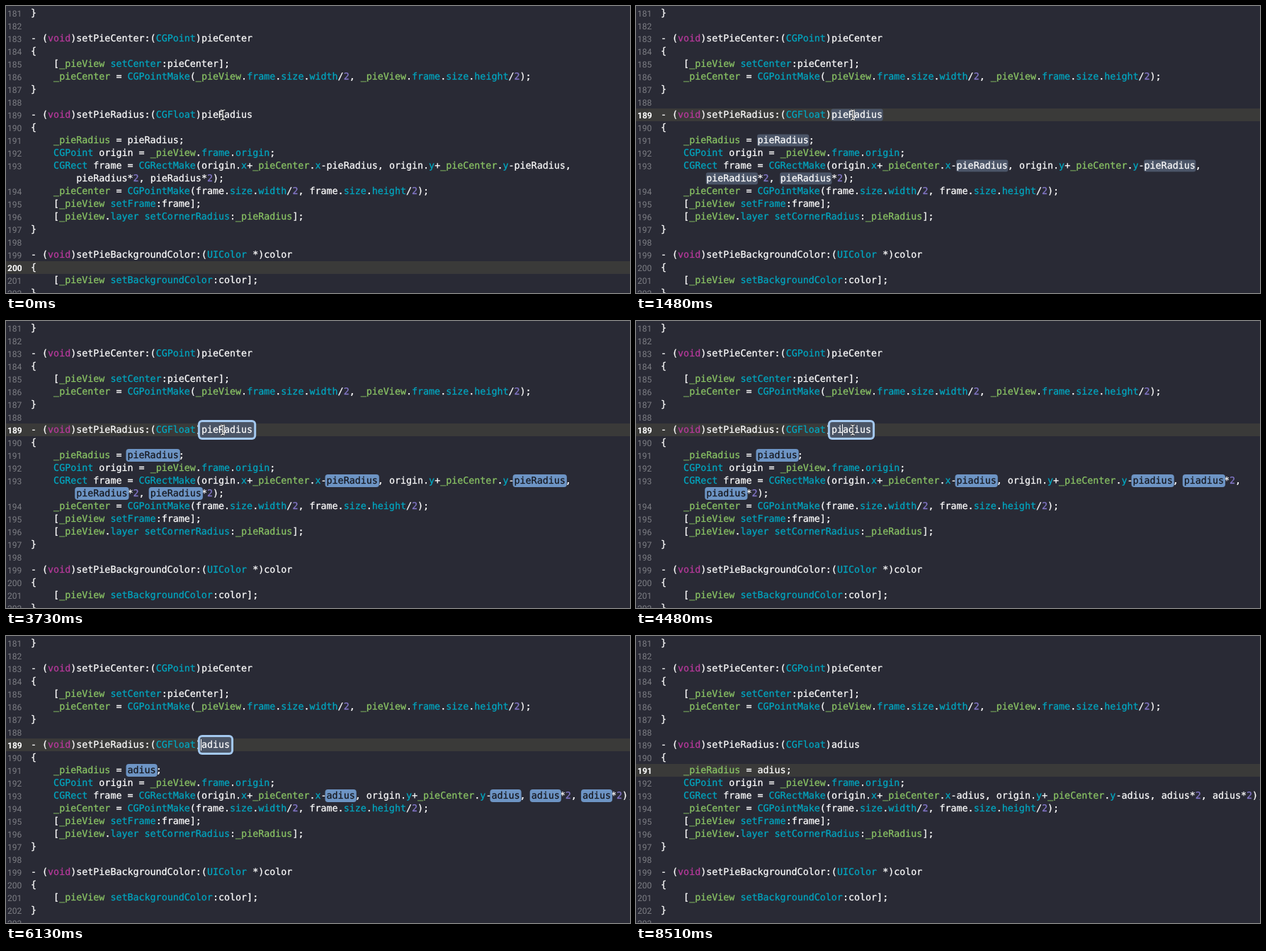
These frames come from a looping animation (881x406 px, 8560 ms). An HTML page with a canvas:

```html
<!DOCTYPE html>
<html lang="en">
<head>
<meta charset="utf-8">
<title>Rename in scope</title>
<style>
  html, body { margin: 0; height: 100%; overflow: hidden; background: #292a35; }
  canvas { display: block; }
</style>
</head>
<body>
<canvas width="881" height="406"></canvas>
<script>
const ctx = document.querySelector('canvas').getContext('2d');
const LOOP = 8560, STEP = 150, BLINK = 450;
const ROW = 18, LEFT = 35, CHAR = 8.03, WRAP = 106, FIRST = 181;
const CODE_FONT = '13.34px "DejaVu Sans Mono", monospace';
const colors = { plain: '#fff', keyword: '#b8399c', known: '#00a8c2', own: '#8bc565', number: '#8578cb' };

// "@" stands for the symbol being renamed, "|" for a place where the line may wrap.
const source = `}

- (void)setPieCenter:(CGPoint)pieCenter
{
    [_pieView setCenter:pieCenter];
    _pieCenter = CGPointMake(_pieView.frame.size.width/2, _pieView.frame.size.height/2);
}

- (void)setPieRadius:(CGFloat)@
{
    _pieRadius = @;
    CGPoint origin = _pieView.frame.origin;
    CGRect frame = CGRectMake(origin.x+_pieCenter.x-@, origin.y+_pieCenter.y-@,| @*2,| @*2);
    _pieCenter = CGPointMake(frame.size.width/2, frame.size.height/2);
    [_pieView setFrame:frame];
    [_pieView.layer setCornerRadius:_pieRadius];
}

- (void)setPieBackgroundColor:(UIColor *)color
{
    [_pieView setBackgroundColor:color];
}
`.split('\n');
const tokens = /(@|void|_\w+|CG\w+|UIColor|(?<= )set\w+|(?<=\.)\w+|\d+)/;

// The user's actions, in ms.
const word = 'pieRadius', wordCol = 30, clickedLetter = 4;
const click = 150, select = 580, mark = 740, hover = 2080, edit = 2680, release = 3130;
const deletions = [4180, 4480, 4630, 4930];
const leave = 5530, gone = 6130, back = 6430, commit = 6860, rest = 7010;
const actions = [click, select, edit, ...deletions, commit, rest];

// The pointer is seen only once per step, so its glide is jerky.
function glide(t, start, end, [x0, y0], [x1, y1]) {
  const p = Math.min(1, Math.floor((t - start) / STEP) * STEP / (end - start));
  return [x0 + (x1 - x0) * p, y0 + (y1 - y0) * p];
}

function pointerAt(t) {
  if (t < leave) return [306, 154];
  if (t < gone) return glide(t, leave, gone, [202, 215], [1000, 330]);
  if (t < back) return null;
  if (t < rest + BLINK) return glide(t, back, commit, [870, 318], [522, 191]);
  return t < rest + BLINK + STEP ? [655, 244] : null;
}

function stateAt(t) {
  const left = clickedLetter - deletions.filter(time => time <= t).length;
  const lastAction = actions.findLast(time => time <= t);
  const done = t >= commit;
  return {
    name: word.slice(0, left) + word.slice(clickedLetter),
    line: done ? 191 : t < click ? 200 : 189,
    mark: done || t < mark ? '' : t < edit ? 'same' : 'edit',
    hover: t >= hover,
    hand: t >= hover && t < release,
    caret: Math.floor((t - lastAction) / BLINK) % 2 === 0,
    caretCol: done ? 23 : wordCol + left,
    pointer: pointerAt(t)
  };
}

function colorOf(token) {
  if (token === 'void') return colors.keyword;
  if (token[0] === '_') return colors.own;
  return /^\d/.test(token) ? colors.number : colors.known;
}

function wrap(line, name) {
  const rows = [''];
  for (const part of line.split('|')) {
    const joined = rows.at(-1) + part;
    if (joined.replaceAll('@', name).length <= WRAP) rows[rows.length - 1] = joined;
    else rows.push(' '.repeat(8) + part.trim());
  }
  return rows;
}

function box(x, y, w, h, radius, fill) {
  ctx.fillStyle = fill;
  ctx.beginPath();
  ctx.roundRect(x, y, w, h, radius);
  ctx.fill();
}

// A hairline stroke gives the code its medium weight.
function code(str, x, top, color) {
  ctx.font = CODE_FONT;
  ctx.fillStyle = ctx.strokeStyle = color;
  ctx.lineWidth = .25;
  ctx.fillText(str, x, top + 13);
  ctx.strokeText(str, x, top + 13);
}

function lineNumber(number, top, current) {
  ctx.font = `${current ? 700 : 400} 12px Roboto, sans-serif`;
  ctx.fillStyle = current ? '#fff' : '#7d7e84';
  ctx.fillText(number, 2, top + 14);
}

function drawSymbol(x, top, main, s) {
  const w = s.name.length * CHAR;
  let color = colors.plain;
  if (s.mark === 'edit' && main) {
    box(x - 5, top - 5, w + 10, 28, 6, '#a3c8ee');
    box(x - 2, top - 2, w + 4, 22, 3, '#4b5566');
  } else if (s.mark === 'edit') {
    box(x - 2, top, w + 4, 18, 4, '#6d94c4');
    color = '#15161c';
  } else if (s.mark === 'same') {
    box(x - .5, top + .5, w + 1, 17, 3, main && s.hover ? '#5d6a80' : '#4b5568');
  }
  code(s.name, x, top, color);
}

function drawRow(str, top, main, s) {
  let x = LEFT;
  const symbols = [];
  str.split(tokens).forEach((token, i) => {
    if (token === '@') symbols.push(x);
    else code(token, x, top, i % 2 ? colorOf(token) : colors.plain);
    x += (token === '@' ? s.name : token).length * CHAR;
  });
  symbols.forEach(at => drawSymbol(at, top, main, s));
}

const beam = new Path2D('M-3-7Q0-7 0-5Q0-7 3-7M0-5V5M-3 7Q0 7 0 5Q0 7 3 7M-1.5 2H1.5');
const hand = new Path2D('M-3 1Q-3-1-1.5-1T0 1V5Q1 3.5 2.5 5Q4 4 5 5.5Q7 5 7 7V10Q7 12 5.5 15H-2Q-3 12-6 9Q-6 6.5-3 9Z');

function drawPointer([x, y], isHand) {
  const shape = isHand ? hand : beam;
  ctx.save();
  ctx.translate(x, y);
  ctx.lineJoin = ctx.lineCap = 'round';
  ctx.strokeStyle = '#111';
  ctx.lineWidth = 2.2;
  ctx.stroke(shape);
  ctx.fillStyle = ctx.strokeStyle = '#fff';
  ctx.lineWidth = 1.2;
  isHand ? ctx.fill(shape) : ctx.stroke(shape);
  ctx.restore();
}

function draw(t) {
  const s = stateAt(t);
  ctx.fillStyle = '#292a35';
  ctx.fillRect(0, 0, 881, 406);
  let top = 1;
  source.forEach((line, i) => {
    const number = FIRST + i, current = number === s.line, lineTop = top;
    if (current) {
      ctx.fillStyle = '#3a3a39';
      ctx.fillRect(0, top, 881, ROW);
    }
    lineNumber(number, top, current);
    for (const row of wrap(line, s.name)) {
      drawRow(row, top, number === 189, s);
      top += ROW;
    }
    if (current && s.caret) {
      ctx.fillStyle = '#fff';
      ctx.fillRect(Math.floor(LEFT + s.caretCol * CHAR), lineTop + 1, 1, 16);
    }
  });
  if (s.pointer) drawPointer(s.pointer, s.hand);
}

ctx.textRendering = 'geometricPrecision';
(function frame() {
  draw(performance.now() % LOOP);
  requestAnimationFrame(frame);
})();
</script>
</body>
</html>
```
